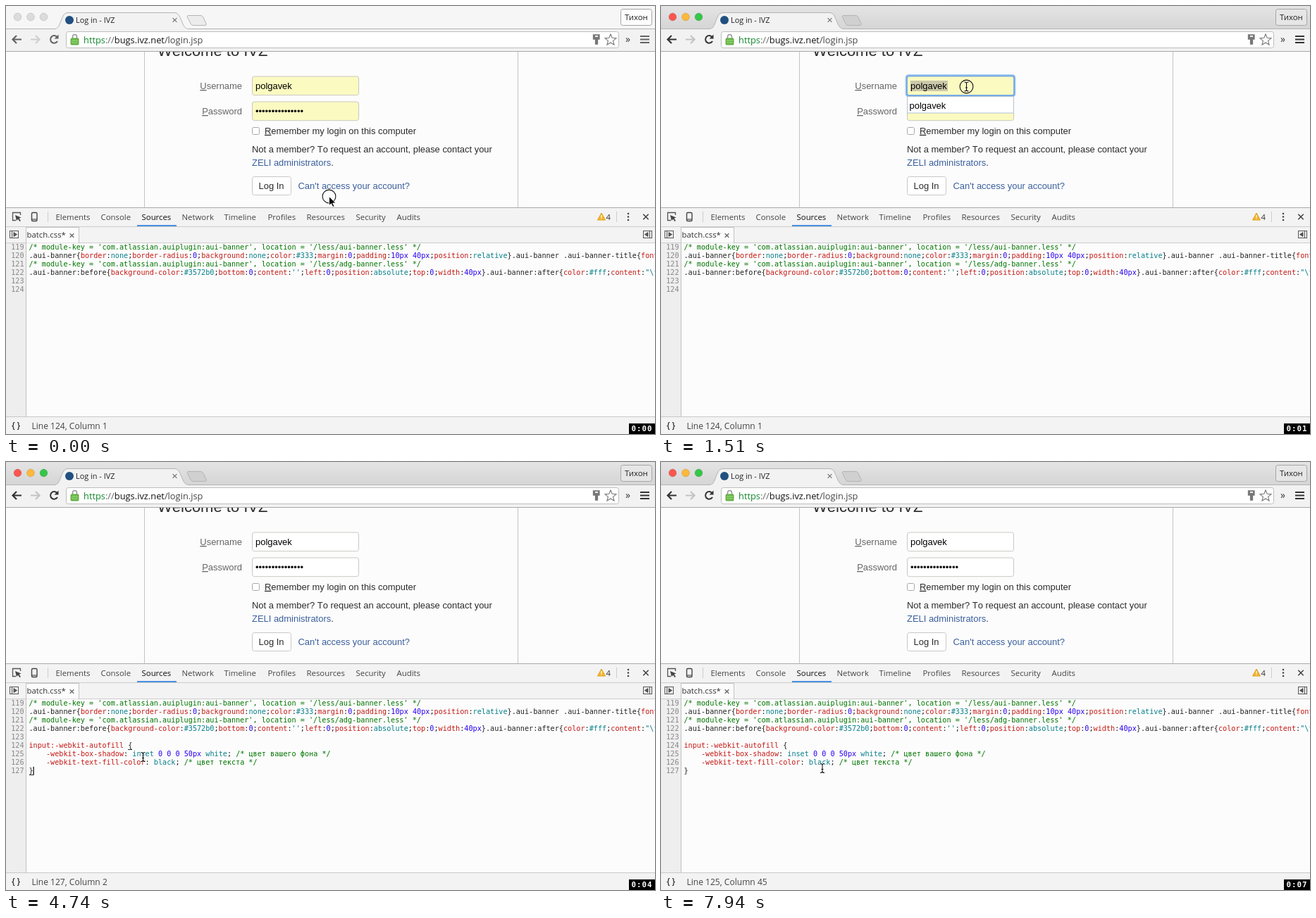
Animation, 921 px wide and 608 px high, one loop 8000 ms. Source, as an HTML page:

```html
<!DOCTYPE html>
<html lang="en">
<head>
<meta charset="utf-8">
<title>Autofill colour demo</title>
<style>
html, body { margin: 0; width: 921px; height: 608px; overflow: hidden; background: #fcfcfc; }
svg { display: block; }
text { white-space: pre; }
.ui { font-family: "Open Sans", "Noto Sans", sans-serif; font-size: 11.4px; fill: #333; }
.page { font-family: "Liberation Sans", Arial, sans-serif; font-size: 12.95px; font-kerning: none; fill: #2b2b2b; }
.code { font-family: "DejaVu Sans Mono", monospace; font-size: 10.16px; fill: #222; }
.label { fill: #666; }
.link { fill: #3b5f9d; }
.num { fill: #888; text-anchor: end; }
.line { fill: none; stroke: #c4c4c4; }
.icon { fill: none; stroke: #555; stroke-width: 1.3; }
</style>
</head>
<body>
<svg id="stage" width="921" height="608" viewBox="0 0 921 608"></svg>
<script>
const LOOP = 8000;
const stage = document.getElementById('stage');

const text = (x, y, str, cls, extra = '') => `<text x="${x}" y="${y}" class="${cls}" ${extra}>${str}</text>`;
const rect = (x, y, w, h, fill, extra = '') => `<rect x="${x}" y="${y}" width="${w}" height="${h}" fill="${fill}" ${extra}/>`;
const path = (d, cls = 'line', extra = '') => `<path d="${d}" class="${cls}" ${extra}/>`;
const cross = (x, y, r, extra) => path(`M${x - r} ${y - r}l${2 * r} ${2 * r}m0 ${-2 * r}l${-2 * r} ${2 * r}`, 'icon', extra);
const underlined = str => `<tspan text-decoration="underline">${str[0]}</tspan>${str.slice(1)}`;

// Syntax colouring
const TOKEN = /(\/\*.*?\*\/)|(\.[a-z][\w-]*(?::\w+)?)|(input:-webkit-autofill|[a-z-]+(?=:))|(#\w+|"[^"]*"?|'[^']*'|[a-z]+)|(\d+(?:px)?)/g;
const COLORS = ['#007400', '#222', '#c41a16', '#077f8a', '#2a00f0'];
const highlight = line => line.replace(TOKEN, (match, ...groups) =>
  `<tspan fill="${COLORS[groups.slice(0, 5).findIndex(Boolean)]}">${match}</tspan>`);

const FIRST_LINE = 119;
const baseline = n => 346.4 + (n - FIRST_LINE) * 11.97;
const codeLine = (n, str) => text(32.5, baseline(n), highlight(str), 'code');
const lineNumber = n => text(25.5, baseline(n), n, 'code num');
const moduleNote = name =>
  `/* module-key = 'com.atlassian.auiplugin:aui-banner', location = '/less/${name}.less' */`;

function windowFrame() {
  return `
    <linearGradient id="strip" x2="0" y2="1"><stop stop-color="#e4e4e4"/><stop offset="1" stop-color="#d5d5d5"/></linearGradient>
    ${rect(0, 0, 921, 33, '#f6f6f6', 'id="tabStrip"')}
    ${[16.5, 35, 53.5].map(x => `<circle class="light" cx="${x}" cy="15.5" r="5.4" stroke-opacity=".12" stroke="#000"/>`).join('')}
    ${rect(0, 32, 921, 32, '#f2f2f2')}
    ${path('M0 32.5H70C78 32 78 9.5 87 9.5H240C249 9.5 249 32 258 32.5H921', 'line', 'style="fill:#f2f2f2;stroke:#b4b4b4"')}
    ${rect(71, 32, 186, 2, '#f2f2f2')}
    ${path('M258 13.5H276Q279 13.5 280 16L284 25Q285 27.500 282 27.500H266Q263 27.500 262 25L257 15Z', 'line', 'id="newTab" style="stroke:#b4b4b4"')}
    <circle cx="90" cy="20" r="6" fill="#205081"/>
    ${text(99, 24, 'Log in - IVZ', 'ui', 'style="font-size:10.9px;fill:#222"')}
    ${cross(239.5, 20, 2.9, 'style="stroke:#777"')}
    ${rect(872.5, 4.5, 44, 23, '#fdfdfd', 'id="profile" rx="3" stroke="#a5a5a5"')}
    ${text(878, 20, 'Тихон', 'ui', 'style="fill:#222"')}
    <g id="navIcons">
      ${path('M22 47.500H10M15 42L9.500 47.500L15 53', 'icon', 'style="stroke:#333;stroke-width:2.200"')}
      ${path('M35 47.500H47M42 42L47.500 47.500L42 53', 'icon', 'style="stroke:#c4c4c4;stroke-width:2.200"')}
      ${path('M72.500 44A5.300 5.300 0 1 0 73 50', 'icon', 'style="stroke:#333;stroke-width:2"')}
      ${path('M74.500 40.500V46.500H68.500Z', 'icon', 'style="fill:#333;stroke:none"')}
      ${path('M900 43H913M900 47.500H913M900 52H913', 'icon', 'style="stroke:#333;stroke-width:2.200"')}
    </g>
    ${rect(85.5, 36.5, 784, 23, '#fff', 'rx="3" stroke="#bdbdbd"')}
    ${path('M94.500 47V44a3 3.500 0 0 1 6 0V47', 'icon', 'style="stroke:#999;stroke-width:1.600"')}
    ${rect(92, 46, 11, 9, '#6cbb4a', 'rx="1" stroke="#4c9a30" stroke-width=".8"')}
    ${path('M93 49H102M93 52H102', 'icon', 'style="stroke:#9bd780;stroke-width:1"')}
    ${text(110, 52.5, '<tspan fill="#12862f">https</tspan><tspan fill="#666">://</tspan><tspan fill="#111">bugs.ivz.net</tspan><tspan fill="#444">/login.jsp</tspan>', 'ui', 'style="font-size:12.85px"')}
    ${path('M833.500 41H842V47H839.500V54H836.500V47H833.500Z', 'icon', 'style="fill:#777;stroke:#777"')}
    ${rect(836, 42, 4, 2, '#eee')}
    ${path('M858 40L860.200 45.300L866 45.700L861.600 49.400L863 55L858 52L853 55L854.400 49.400L850 45.700L855.800 45.300Z', 'icon', 'style="stroke:#777;stroke-width:1.100"')}
    ${text(879, 52, '»', 'ui', 'style="font-size:14px"')}
    ${path('M0 64.5H921', 'line', 'style="stroke:#a8a8a8"')}`;
}

function field(id, y, content) {
  return rect(349.5, y, 151, 26.7, '#fbfac1', `id="${id}" rx="3" stroke="#c8c8c2"`) + content;
}

function loginPage() {
  return `
    <clipPath id="pageClip"><rect y="65" width="921" height="221"/></clipPath>
    <g clip-path="url(#pageClip)">
      ${rect(0, 65, 921, 221, '#fcfcfc')}
      ${path('M196.5 65V286M726.5 65V286')}
      ${text(215, 71.4, 'Welcome to IVZ', 'page', 'style="font-size:22px"')}
      ${text(335, 118, underlined('Username'), 'page label', 'text-anchor="end"')}
      ${text(335, 154, underlined('Password'), 'page label', 'text-anchor="end"')}
      ${field('userField', 100, `
        <g class="focused"><rect x="348" y="98.600" width="154" height="29.400" rx="3.500" fill="none" stroke="#a9cdf3" stroke-width="3"/>
        <rect x="348.800" y="99.400" width="152.400" height="27.800" rx="2.500" fill="none" stroke="#6fa8e6" stroke-width="1.800"/>
        ${rect(354, 106, 53, 15, '#cbc8aa')}</g>
        ${text(354, 118, 'polgavek', 'page', 'style="fill:#000"')}`)}
      ${field('passField', 136, text(354, 153.5, '•'.repeat(15), 'page', 'style="fill:#000"'))}
      <g class="focused">${rect(349.5, 128.5, 151, 23.5, '#fff', 'stroke="#b4c2d4"')}
      ${text(352.5, 146, 'polgavek', 'page', 'style="fill:#000"')}</g>
      ${rect(349.5, 172.5, 10, 10, '#fff', 'rx="2" stroke="#a8a8a8"')}
      ${text(367, 181.8, underlined('Remember my login on this computer'), 'page')}
      ${text(349, 208.2, 'Not a member? To request an account, please contact your', 'page')}
      ${text(349, 226.7, '<tspan class="link">ZELI administrators</tspan>.', 'page')}
      ${rect(349.5, 242.5, 55, 26, '#fff', 'rx="3" stroke="#c8c8c8"')}
      ${text(358.5, 260, 'Log In', 'page')}
      ${text(414.5, 260, "Can't access your account?", 'page link')}
    </g>`;
}

function devTools() {
  const tabs = { Elements: 71, Console: 135, Sources: 193, Network: 250, Timeline: 310, Profiles: 372, Resources: 427, Security: 497, Audits: 555 };
  return `
    ${rect(0, 286, 921, 322, '#f3f3f3')}
    ${path('M0 286.5H921', 'line', 'style="stroke:#aaa"')}
    ${path('M0 313.5H921M0 336.5H921M59.5 292V307M866.500 292V307', 'line', 'style="stroke:#ccc"')}
    ${path('M14 304.500H9.500V293.500H20.500V297', 'icon')}
    ${path('M13 297L21.500 300.500L18.500 301.800L21 305L19.500 306L17 302.800L15 305Z', 'icon', 'style="fill:#444;stroke:none"')}
    ${rect(36.5, 293.5, 7.5, 12, 'none', 'rx="1.500" stroke="#444" stroke-width="1.400"')}
    ${path('M37 303H44', 'icon')}
    ${Object.entries(tabs).map(([name, x]) => text(x - 0.5, 304, name, 'ui', name === 'Sources' ? 'style="fill:#111"' : 'style="fill:#444"')).join('')}
    ${rect(186, 311, 56, 2, '#4a90e2')}
    ${path('M845 294L850.500 304H839.500Z', 'icon', 'style="fill:#f2b42c;stroke:#e0a018;stroke-width:1"')}
    ${path('M845 297V300.500M845 301.500V302.800', 'icon', 'style="stroke:#fff"')}
    ${text(851.5, 303.5, '4', 'ui')}
    ${[295, 299.5, 304].map(y => `<circle cx="883" cy="${y}" r="1.300" fill="#444"/>`).join('')}
    ${cross(908, 299.5, 3.7, 'style="stroke:#444;stroke-width:1.600"')}
    ${rect(28.5, 314.5, 75, 22.5, '#fcfcfc', 'stroke="#c4c4c4"')}
    ${text(29.5, 329, 'batch.css*', 'ui')}
    ${cross(93.5, 326, 2.8, 'style="stroke:#666"')}
    ${rect(5.5, 319.5, 12, 10, 'none', 'stroke="#555"')}
    ${path('M8.500 320V329M11 321.500L15.500 324.500L11 327.500Z', 'icon', 'style="fill:#555;stroke-width:1"')}
    ${rect(904.5, 319.5, 12, 10, 'none', 'stroke="#555"')}
    ${path('M913.500 320V329M911 321.500L906.500 324.500L911 327.500Z', 'icon', 'style="fill:#555;stroke-width:1"')}
    ${rect(0, 337, 921, 246, '#fcfcfc')}
    ${rect(0, 337, 28, 246, '#eeeeee')}
    ${path('M28.5 337V583', 'line', 'style="stroke:#c0c0c0"')}
    ${[119, 120, 121, 122, 123, 124].map(lineNumber).join('')}
    ${codeLine(119, moduleNote('aui-banner'))}
    ${codeLine(120, '.aui-banner{border:none;border-radius:0;background:none;color:#333;margin:0;padding:10px 40px;position:relative}.aui-banner .aui-banner-title{font-size:14px}')}
    ${codeLine(121, moduleNote('adg-banner'))}
    ${codeLine(122, `.aui-banner:before{background-color:#3572b0;bottom:0;content:'';left:0;position:absolute;top:0;width:40px}.aui-banner:after{color:#fff;content:"\\f129"`)}
    <g id="pasted">
      ${[125, 126, 127].map(lineNumber).join('')}
      ${codeLine(124, 'input:-webkit-autofill {')}
      ${codeLine(125, '    -webkit-box-shadow: inset 0 0 0 50px white; /* цвет вашего фона */')}
      ${codeLine(126, '    -webkit-text-fill-color: black; /* цвет текста */')}
      ${codeLine(127, '}')}
    </g>
    ${path('M173 408.500H179M33 444.500H39', 'line', 'id="brackets" style="stroke:#333"')}
    ${rect(0, 0, 1.2, 12, '#000', 'id="caret"')}
    ${rect(0, 583, 921, 25, '#f3f3f3')}
    ${path('M0 583.5H921', 'line', 'style="stroke:#c8c8c8"')}
    ${text(8, 600, '{ }', 'ui', 'style="font-size:12px;font-weight:600"')}
    ${text(36.5, 600.5, '', 'ui', 'id="status" style="font-size:12.050px;fill:#444"')}
    ${rect(884, 593, 37, 15, '#000')}
    ${text(887.5, 604, '', 'code', 'id="clock" style="font-size:10.800px;font-weight:700;letter-spacing:1px;fill:#fff"')}`;
}

const IBEAM = 'M-3 -6.500Q0 -6.500 0 -4.500Q0 -6.500 3 -6.500M0 -4.500V4.500M-3 6.500Q0 6.500 0 4.500Q0 6.500 3 6.500M-1.500 1.500H1.500';
const pointerShapes = `
  <g id="pointer">
    <circle id="ring" r="9.400" fill="none" stroke="#111" stroke-width="1.100"/>
    <path id="arrow" d="M0 0V13L3 10.200L5.300 15L7.500 14L5.200 9.500H9.500Z" fill="#000" stroke="#fff" stroke-width=".9"/>
    <g id="ibeam" fill="none">
      <path d="${IBEAM}" stroke="#fff" stroke-width="2.400" stroke-opacity=".7"/>
      <path d="${IBEAM}" stroke="#111" stroke-width="1.100"/>
    </g>
  </g>`;

stage.innerHTML = loginPage() + windowFrame() + devTools() + pointerShapes;
const el = Object.fromEntries([...stage.querySelectorAll('[id]')].map(node => [node.id, node]));
const focusParts = stage.querySelectorAll('.focused');
const lights = stage.querySelectorAll('.light');

const START = [458.5, 270.5];
const MOVES = [
  [300, 820, [[457, 262], [454, 240], [449, 208], [443, 172], [438, 142], [434, 121], [433.5, 114.5]]],
  [1960, 2240, [[450, 115], [495, 119], [538, 124], [552, 126]]],
  [2690, 3230, [[510, 149], [496, 190], [478, 245], [410, 300], [315, 355], [240, 398], [194.5, 419]]],
  [5560, 6280, [[203, 419], [227, 418], [260, 417], [294, 416], [318, 416], [328, 416], [336, 417], [342, 417], [344, 417]]],
  [6370, 6530, [[330, 416], [308, 415], [301, 415]]],
  [7340, 7940, [[306, 424], [320, 452], [334, 485], [338, 497], [308, 491], [268, 474], [243, 455], [229, 435]]],
];
const CLICKS = [[0, 90], [1000, 1090], [1510, 1600], [2420, 2510], [3410, 3490], [6530, 6620]];
// Visible spans of the editor caret: from, to, x, line
const CARETS = [
  [1000, 1510, 32, 124], [3410, 3940, 32, 124], [4480, 5100, 38.5, 127],
  [5650, 6190, 38.5, 127], [6530, 6890, 301, 125], [7430, 7940, 301, 125],
];
const SECONDS = [1090, 2060, 3050, 4120, 5200, 6100, 7340];

const within = (t, [from, to]) => t >= from && t < to;
const show = (node, on) => node.setAttribute('visibility', on ? 'visible' : 'hidden');

function pointerAt(t) {
  const move = MOVES.filter(([start]) => t >= start).pop();
  if (!move) return START;
  const [start, end, points] = move;
  const step = Math.floor((t - start) / (end - start) * (points.length - 1) + 1e-6);
  return points[Math.min(step, points.length - 1)];
}

function render(t) {
  const active = t >= 1000;
  el.tabStrip.setAttribute('fill', active ? 'url(#strip)' : '#f6f6f6');
  lights.forEach((light, i) => light.setAttribute('fill', active ? ['#fc5650', '#fdb93a', '#35c649'][i] : '#dcdcdc'));
  el.newTab.style.fill = active ? '#d0d0d0' : '#ececec';
  el.profile.setAttribute('fill', active ? '#e6e6e6' : '#fdfdfd');
  el.navIcons.setAttribute('opacity', active ? 1 : 0.75);

  const focused = within(t, [1510, 2420]);
  focusParts.forEach(node => show(node, focused));
  const fieldFill = t < 4740 ? '#fbfac1' : '#fff';
  el.userField.setAttribute('fill', fieldFill);
  el.passField.setAttribute('fill', fieldFill);

  show(el.pasted, t >= 4480);
  show(el.brackets, within(t, [4480, 6530]));
  const caret = CARETS.find(span => within(t, span));
  show(el.caret, caret);
  if (caret) el.caret.setAttribute('transform', `translate(${caret[2]} ${baseline(caret[3]) - 9.3})`);
  el.status.textContent = t < 4480 ? 'Line 124, Column 1' : t < 6530 ? 'Line 127, Column 2' : 'Line 125, Column 45';
  el.clock.textContent = '0:0' + SECONDS.filter(s => t >= s).length;

  const [x, y] = pointerAt(t);
  const overField = active && y > 99 && y < 128 && x > 348 && x < 502;
  const textual = overField || y > 337;
  el.pointer.setAttribute('transform', `translate(${x} ${y})`);
  show(el.ring, CLICKS.some(span => within(t, span)));
  show(el.arrow, !textual);
  show(el.ibeam, textual);
}

const origin = performance.now();
function tick() {
  render((performance.now() - origin) % LOOP);
  requestAnimationFrame(tick);
}
tick();
</script>
</body>
</html>
```
